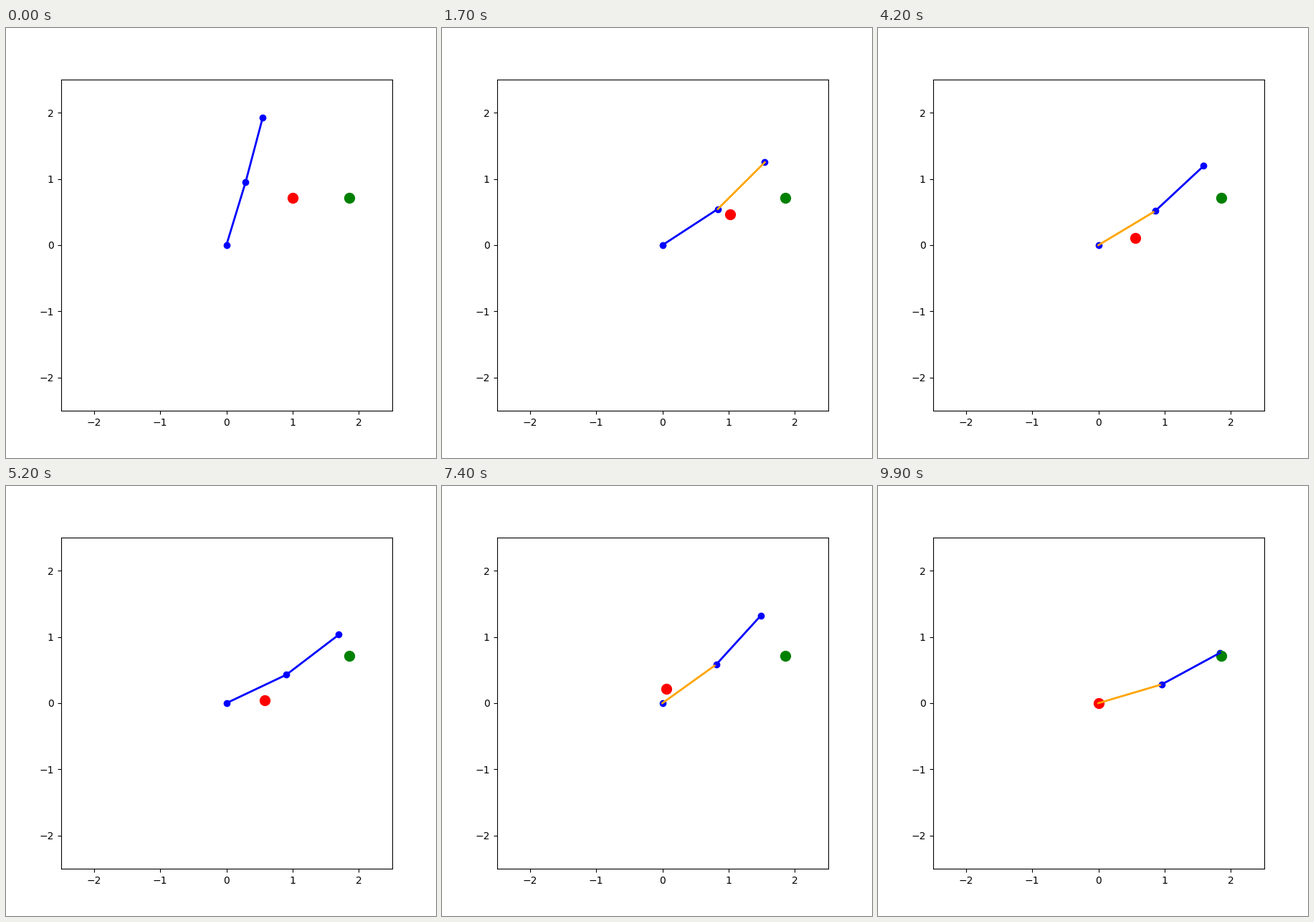
A matplotlib script for the animation above (10000 ms loop, 600 by 600 pixels).

```python
import numpy as np
import matplotlib.pyplot as plt
from matplotlib.animation import FuncAnimation

FRAMES = 100
STEP_MS = 100
START = np.radians([73.05, 2.1])
GOAL = np.radians([15, 12])
GAIN = np.array([0.1, 0.2])  # share of the remaining angle closed per step
HIT = 0.2                    # a link closer to the obstacle turns orange
KEEP = 0.212                 # distance the arm tries to keep
DAMPING = 0.2

# Turning points of the wandering obstacle: (step, x, y)
TURNS = np.array([
    (0, 1, 0.714), (17, 1.023, 0.465), (33, 0.611, 0.054), (36, 0.55, 0),
    (41, 0.56, 0.11), (52, 0.579, 0.043), (62, 0.56, 0.07),
    (66, 0.449, 0.162), (69, 0.1, 0.17), (82, 0.005, 0.303), (99, 0, 0),
])


def obstacle_at(n):
    t, x, y = TURNS.T
    return np.array([np.interp(n, t, x), np.interp(n, t, y)])


def joints(angles):
    """Positions of base, elbow and hand for two unit links."""
    a = np.cumsum(angles)
    links = np.column_stack([np.cos(a), np.sin(a)])
    return np.vstack([[0, 0], np.cumsum(links, axis=0)])


def nearest(p, a, b):
    """Distance from p to unit link ab, and how far along the link it is."""
    along = np.clip(np.dot(p - a, b - a), 0, 1)
    return np.hypot(*(p - a - along * (b - a))), along


def step(angles, obstacle):
    """Turn towards the goal, backing off from an obstacle ahead."""
    angles = angles + GAIN * (GOAL - angles)
    base, elbow, _ = joints(angles)
    dist, lever = nearest(obstacle, base, elbow)
    ahead = elbow[0] * obstacle[1] < elbow[1] * obstacle[0]
    if ahead and dist < KEEP:
        angles[0] += (KEEP - dist) * lever / (lever ** 2 + DAMPING)
    return angles


def simulate():
    poses = [START]
    for n in range(1, FRAMES):
        poses.append(step(poses[-1], obstacle_at(n)))
    return poses


poses = simulate()

fig, ax = plt.subplots(figsize=(6, 6), dpi=100)
ax.set_xlim(-2.5, 2.5)
ax.set_ylim(-2.5, 2.5)
ax.set_aspect("equal")

dots, = ax.plot([], [], "o", color="blue")
ax.plot(*joints(GOAL)[2], "o", color="green", markersize=10)
ball, = ax.plot([], [], "o", color="red", markersize=10)
links = [ax.plot([], [], color="blue", lw=2)[0] for _ in range(2)]


def update(n):
    pts = joints(poses[n])
    obstacle = obstacle_at(n)
    dots.set_data(*pts.T)
    ball.set_data([obstacle[0]], [obstacle[1]])
    for link, a, b in zip(links, pts[:-1], pts[1:]):
        link.set_data([a[0], b[0]], [a[1], b[1]])
        hit = nearest(obstacle, a, b)[0] < HIT
        link.set_color("orange" if hit else "blue")
    return [dots, ball, *links]


anim = FuncAnimation(fig, update, frames=FRAMES, interval=STEP_MS,
                     repeat=True, repeat_delay=0)
plt.show()
```
